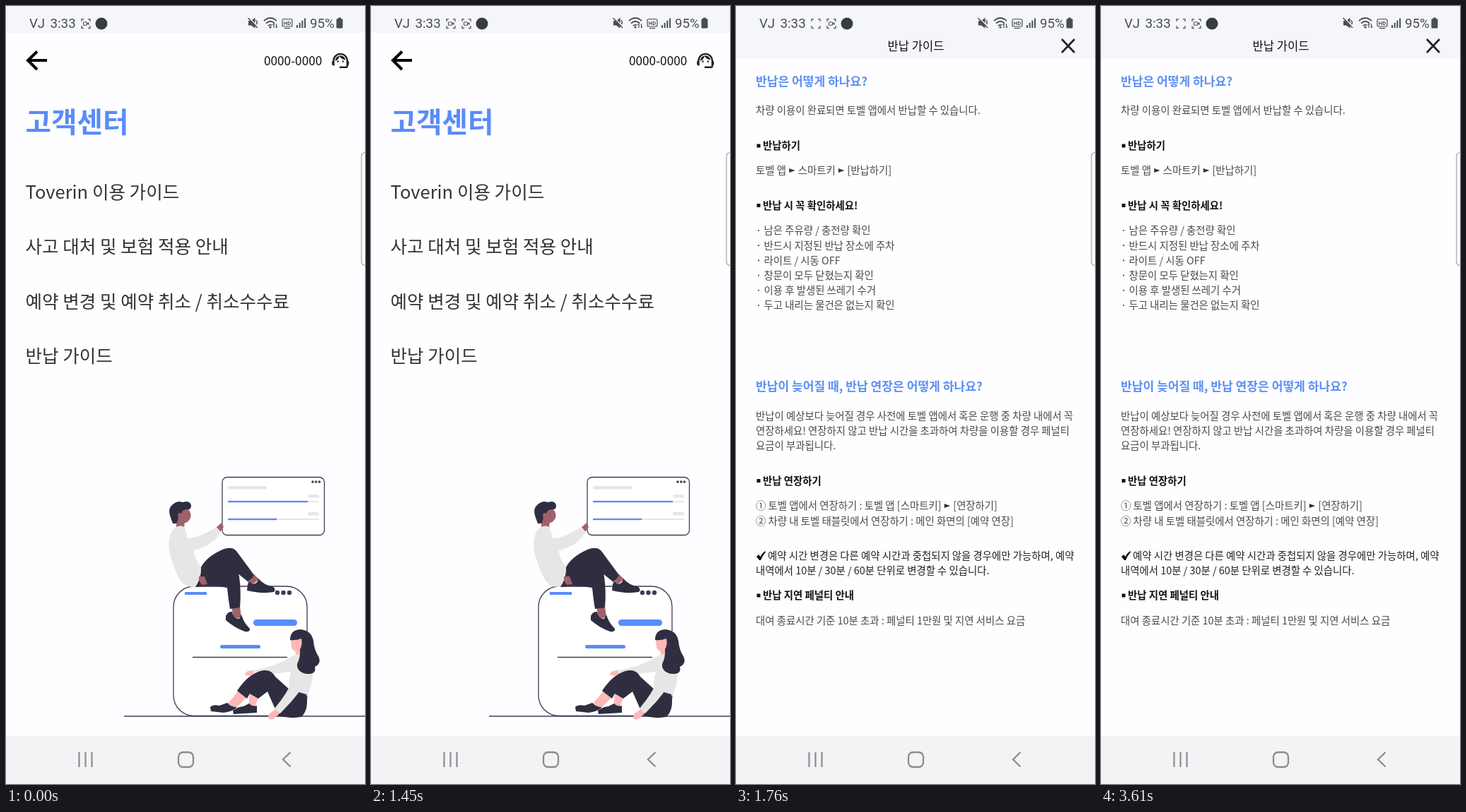
These frames come from a looping animation (508 by 1102 pixels, 3.73 s). An HTML page with a canvas:

```html
<!DOCTYPE html>
<html lang="ko">
<head>
<meta charset="utf-8">
<title>고객센터</title>
<style>
html, body { margin: 0; width: 100%; height: 100%; overflow: hidden; background: #fefdff; }
canvas { display: block; width: 508px; height: 1102px; }
</style>
</head>
<body>
<canvas id="stage" width="508" height="1102"></canvas>
<script>
const LOOP = 3730, W = 508, H = 1102, MID_X = 254, MID_Y = 536;
const KR = '"Noto Sans CJK KR", "Noto Sans CJK", sans-serif';
const PAGE = '#fefdff', BAR = '#f4f6f9', BLUE = '#598cfa', INK = '#2f2e41', LINE = '#3f3d56';
const LIGHT = '#e6e6e6', BROWN = '#a0616a', PINK = '#ffb8b8', ICON = '#4a4d52';

const main = document.getElementById('stage').getContext('2d');
const sheet = document.createElement('canvas').getContext('2d');
sheet.canvas.width = W;
sheet.canvas.height = H;
let ctx = main;

const clamp = v => Math.max(0, Math.min(1, v));
const ramp = (t, a, b) => clamp((t - a) / (b - a));
const ease = p => (1 - Math.cos(Math.PI * p)) / 2;

function text(s, x, y, size, color, weight = 400, family = KR) {
  ctx.font = `${weight} ${size}px ${family}`;
  ctx.fillStyle = color;
  ctx.fillText(s, x, y);
}
function rect(x, y, w, h, color) {
  ctx.fillStyle = color;
  ctx.fillRect(x, y, w, h);
}
function shape(d, color) {
  ctx.fillStyle = color;
  ctx.fill(new Path2D(d));
}
function stroke(d, color, width) {
  ctx.strokeStyle = color;
  ctx.lineWidth = width;
  ctx.stroke(new Path2D(d));
}
function dot(x, y, r, color) {
  ctx.fillStyle = color;
  ctx.beginPath();
  ctx.arc(x, y, r, 0, 7);
  ctx.fill();
}
function box(x, y, w, h, r, fill, line, width) {
  ctx.beginPath();
  ctx.roundRect(x, y, w, h, r);
  if (fill) { ctx.fillStyle = fill; ctx.fill(); }
  if (line) { ctx.strokeStyle = line; ctx.lineWidth = width; ctx.stroke(); }
}

// Draws a page on its own sheet, then lays it down as one piece.
function layer(alpha, scale, draw) {
  ctx = sheet;
  ctx.clearRect(0, 0, W, H);
  ctx.save();
  ctx.translate(MID_X, MID_Y);
  ctx.scale(scale, scale);
  ctx.translate(-MID_X, -MID_Y);
  draw();
  ctx.restore();
  ctx = main;
  ctx.globalAlpha = alpha;
  ctx.drawImage(sheet.canvas, 0, 0);
  ctx.globalAlpha = 1;
}

function windows() {
  stroke('M167 1006H560', LINE, 1.4);
  box(237, 822, 189, 183.5, 29, '#fff', LINE, 1.3);
  for (const x of [384, 392.5, 401]) dot(x, 831, 3.2, LINE);
  rect(253, 830, 31, 4, BLUE);
  box(350, 869, 62, 9, 4.5, BLUE);
  box(303, 905, 57, 5, 2.5, BLUE);
  stroke('M264 922.5H398', LINE, 1.4);
}
function panel() {
  box(306, 667.5, 144.5, 82, 7, '#fff', LINE, 1.3);
  for (const x of [434, 438.8, 443.5]) dot(x, 674, 1.8, LINE);
  box(314, 680, 55, 4.5, 2, LIGHT);
  for (const [y, end] of [[702, 427], [727, 383]]) {
    box(427, y - 10, 16, 4.5, 2, LIGHT);
    rect(314, y - 1, 129, 2, LIGHT);
    rect(314, y - 1.2, end - 314, 2.4, BLUE);
  }
}
function man() {
  shape('M297 739L305 732L308 738L303 745Z', BROWN);
  shape('M241 728L253 728L252 740L241 741Z', BROWN);
  dot(250.5, 721.5, 11, BROWN);
  shape('M232 722Q229 711 236 706Q243 700 250 703Q260 700 262 707Q262 714 257 713Q250 712 248 719Q244 716 243 721Q245 727 241 733L236 733Z', INK);
  shape('M237 741Q245 734 252 738Q256 748 257 754Q272 754 298 738L304 745Q292 765 266 771Q266 782 275 793Q281 803 282 812L268 823Q254 824 247 814Q238 799 232 777Q227 753 237 741Z', LIGHT);
  shape('M341 814L351 805L358 812L346 822Z', BROWN);
  shape('M319 850H331L333 866L322 868Z', BROWN);
  shape('M268 823Q277 810 276 795Q283 781 304 771Q319 764 326 772L351 806Q348 812 342 815L318 796Q329 799 330 808Q333 830 331 852L317 854Q315 843 313 824Q294 820 268 823Z', INK);
  shape('M273 808L281 808L285 819L277 820Q272 814 273 808Z', BROWN);
  shape('M342 819Q345 813 348 819Q356 819 357 811Q366 821 377 822Q383 826 379 830Q362 833 341 828Z', INK);
  shape('M311 864Q314 857 320 858Q321 868 330 868L333 862Q336 873 345 882Q346 887 338 886Q324 881 311 870Z', INK);
}
function woman() {
  shape('M352 949L338 948Q338 941 349 941Z', PINK);
  shape('M403 896H419V918L410 919L409 913Q403 914 403 896Z', PINK);
  shape('M349 941Q380 937 403 922Q412 916 422 920L434 947Q434 958 426 978L402 972Q398 960 403 943L352 949Z', LIGHT);
  shape('M314 988L328 971L341 979L325 995Z', PINK);
  shape('M345 973L358 978L352 993H343Z', PINK);
  shape('M289 993Q293 989 302 991L313 987Q319 993 326 993Q325 998 308 1001L290 999Z', INK);
  shape('M321 998Q329 992 336 992L344 988Q349 993 355 991L355 1001L322 1003Z', INK);
  shape('M327 970Q344 944 365 941Q376 940 381 950L401 968L425 975Q429 996 418 1007Q400 1010 385 1005L370 971L357 981L345 974L341 981Z', INK);
  shape('M383 995L388 1001Q380 1010 375 1011Q368 1009 373 1002Z', PINK);
  shape('M415 934L432 947Q420 966 404 985L388 1002L380 995Q398 974 407 952Z', LIGHT);
  shape('M402 898Q402 884 416 883Q432 884 435 899Q436 912 442 921Q447 931 437 936Q440 947 425 946Q411 943 412 932Q417 922 416 911Q420 905 418 896Q410 899 402 898Z', INK);
}

function headset() {
  ctx.save();
  ctx.translate(458.7, 63.2);
  ctx.scale(1.21, 1.18);
  shape('M21 12.2C21 6.7 16.7 3 12 3C7.3 3 3 6.7 3 12.3Q2 12.9 2 14V16Q2 18 4 18H5V11.9A7 7 0 0 1 19 11.9V19H11V21H19Q21 21 21 19V17.8Q22 17.3 22 16V14Q22 12.8 21 12.2Z', '#222');
  shape('M18 11A6 6 0 0 0 12 6C9 6 5.8 8.5 6 12.4A8 8 0 0 0 10.9 6.6C12.2 9.2 14.9 11 18 11Z', '#222');
  dot(9, 13, 1, '#222');
  dot(15, 13, 1, '#222');
  ctx.restore();
}
function home(press) {
  rect(-60, -60, W + 120, H + 120, PAGE);
  stroke('M31 77H58M44 64.5L31 77L44 90', '#000', 4);
  text('0000-0000', 365, 84, 17.2, '#111');
  headset();
  text('고객센터', 27.5, 179, 39.7, BLUE, 700);
  const rows = ['Toverin 이용 가이드', '사고 대처 및 보험 적용 안내',
    '예약 변경 및 예약 취소 / 취소수수료', '반납 가이드'];
  rows.forEach((s, i) => {
    ctx.globalAlpha = i === 3 ? press : 1;
    text(s, 27.5, 273.2 + i * 77.2, 25.55, '#333');
  });
  ctx.globalAlpha = 1;
  windows();
  panel();
  man();
  woman();
}

const BODY = 14.4;
function line(s, x, y, color = '#4a4a4a') {
  const base = y + 5.4;
  s.split('►').forEach((part, i) => {
    if (i) {
      shape(`M${x + 1} ${y - 3}L${x + 9.5} ${y}L${x + 1} ${y + 3}Z`, '#333');
      x += 10.3;
    }
    text(part, x, base, BODY, color);
    x += ctx.measureText(part).width;
  });
}
function lines(list, y, x = 28, color) {
  list.forEach((s, i) => line(s, x, y + i * 21.2, color));
}
function topic(s, y) {
  text(s, 28, y + 6.5, 17.1, '#5b90f2', 700);
}
function point(s, y) {
  rect(29.5, y - 2.5, 5, 5, '#111');
  text(s, 38, y + 5.4, BODY, '#111', 700);
}
function guide() {
  rect(0, 38, W, H, PAGE);
  rect(0, 0, W, 74.5, BAR);
  text('반납 가이드', 214.5, 63.3, 16.6, '#111');
  stroke('M461 47L479 66M479 47L461 66', '#222', 2.7);
  topic('반납은 어떻게 하나요?', 106);
  line('차량 이용이 완료되면 토벨 앱에서 반납할 수 있습니다.', 28, 148);
  point('반납하기', 198);
  line('토벨 앱 ► 스마트키 ► [반납하기]', 28, 233);
  point('반납 시 꼭 확인하세요!', 282.5);
  const checks = ['남은 주유량 / 충전량 확인', '반드시 지정된 반납 장소에 주차', '라이트 / 시동 OFF',
    '창문이 모두 닫혔는지 확인', '이용 후 발생된 쓰레기 수거', '두고 내리는 물건은 없는지 확인'];
  lines(checks, 318, 39.5);
  checks.forEach((_, i) => dot(32, 318 + i * 21.2, 1.1, '#4a4a4a'));
  topic('반납이 늦어질 때, 반납 연장은 어떻게 하나요?', 538.5);
  lines(['반납이 예상보다 늦어질 경우 사전에 토벨 앱에서 혹은 운행 중 차량 내에서 꼭',
    '연장하세요! 연장하지 않고 반납 시간을 초과하여 차량을 이용할 경우 페널티',
    '요금이 부과됩니다.'], 580.5);
  point('반납 연장하기', 672.5);
  lines(['① 토벨 앱에서 연장하기 : 토벨 앱 [스마트키] ► [연장하기]',
    '② 차량 내 토벨 태블릿에서 연장하기 : 메인 화면의 [예약 연장]'], 708);
  shape('M29 780L32 777L34.5 780Q37 775 41 772L42 773.5Q37 779 35 785H33Z', '#111');
  line('예약 시간 변경은 다른 예약 시간과 중첩되지 않을 경우에만 가능하며, 예약', 45, 778.5, '#222');
  line('내역에서 10분 / 30분 / 60분 단위로 변경할 수 있습니다.', 28, 799.7, '#222');
  point('반납 지연 페널티 안내', 835);
  line('대여 종료시간 기준 10분 초과 : 페널티 1만원 및 지연 서비스 요금', 28, 870.5);
}

function capture(x, camera, alpha = 1) {
  ctx.save();
  ctx.globalAlpha = alpha;
  ctx.translate(x, 25);
  stroke('M-6 -3V-6.3H-3M3 -6.3H6V-3M6 3V6.3H3M-3 6.3H-6V3', ICON, 1.2);
  if (camera) {
    box(-3.5, -2.2, 5, 4.4, 1, null, ICON, 1.1);
    shape('M1.5 0L4.5 -2.2V2.2Z', ICON);
  }
  ctx.restore();
}
function statusBar(t) {
  rect(0, 0, W, 38, BAR);
  const roboto = 'Roboto, sans-serif';
  text('VJ', 33, 31, 18.6, ICON, 400, roboto);
  text('3:33', 62.5, 31, 18.8, ICON, 400, roboto);
  const slide = ease(ramp(t, 30, 330)) * 22;
  const recording = t < 30 || (t - 30) % 1020 < 510;
  if (slide) capture(113, recording, ramp(t, 130, 340));
  capture(113 + slide, true);
  dot(135 + slide, 25, 8.5, '#383b40');

  shape('M343 21H347L352.5 16.5V31.5L347 27.5H343Z', ICON);
  stroke('M343.5 16L357 30', BAR, 1.6);
  stroke('M342.5 17L356 31M353.5 20Q356.5 22.5 354.5 26', ICON, 1.5);
  stroke('M365 21Q374 13 383 21M368 24.5Q374 19 380 24.5M371 28Q374 25.5 376 27.5', ICON, 1.7);
  dot(374, 30, 1.6, ICON);
  stroke('M379 31V25M382.5 25V31M377.5 27L379 25M384 29L382.5 31', ICON, 1.2);
  box(391, 18.5, 14, 10.5, 2, null, ICON, 1.2);
  text('HD', 392.8, 27, 7.6, ICON, 700, roboto);
  stroke('M394 31.5H402', ICON, 1.2);
  for (let i = 0; i < 4; i++) rect(411 + i * 3.7, 27 - i * 3.2, 2, 4 + i * 3.2, ICON);
  text('95%', 430, 31, 18.8, ICON, 400, roboto);
  box(467.5, 18, 9, 13.5, 1.5, ICON);
  rect(470, 16.5, 4, 2, ICON);
}
function navBar() {
  rect(0, 1034, W, 68, '#f3f3f6');
  const gray = '#8c8c8f';
  stroke('M103.5 1057V1078M112.5 1057V1078M121.5 1057V1078', gray, 2.2);
  box(244, 1057, 21, 21, 6.5, null, gray, 2.3);
  stroke('M402.5 1057L392 1067.3L402.5 1077.5', gray, 2.3);
}

function touch(alpha) {
  ctx.globalAlpha = alpha;
  box(343.5, 607.5, 32, 32, 16, 'rgba(244,245,254,.55)', '#cfd3ea', 2.2);
  ctx.globalAlpha = 1;
}
function pressAlpha(t) {
  return 1 - 0.8 * ramp(t, 1450, 1540) + 0.8 * ramp(t, 1565, 1755);
}
function render(t) {
  const p = ease(ramp(t, 1543, 1752));
  const fade = ramp(t, 1685, 1760);
  rect(0, 0, W, H, PAGE);
  if (fade < 1) layer(1 - fade / 2, 1 + 0.147 * p, () => home(pressAlpha(t)));
  if (fade > 0) layer(fade, 0.85 + 0.15 * p, guide);
  touch(ramp(t, 2360, 2400) * (1 - ramp(t, 2480, 2530)));
  box(503, 207.5, 20, 160, 5, '#fefefe', '#a2a2a6', 1.2);
  statusBar(t);
  navBar();
}

const start = performance.now();
function tick() {
  render((performance.now() - start) % LOOP);
  requestAnimationFrame(tick);
}
tick();
</script>
</body>
</html>
```
